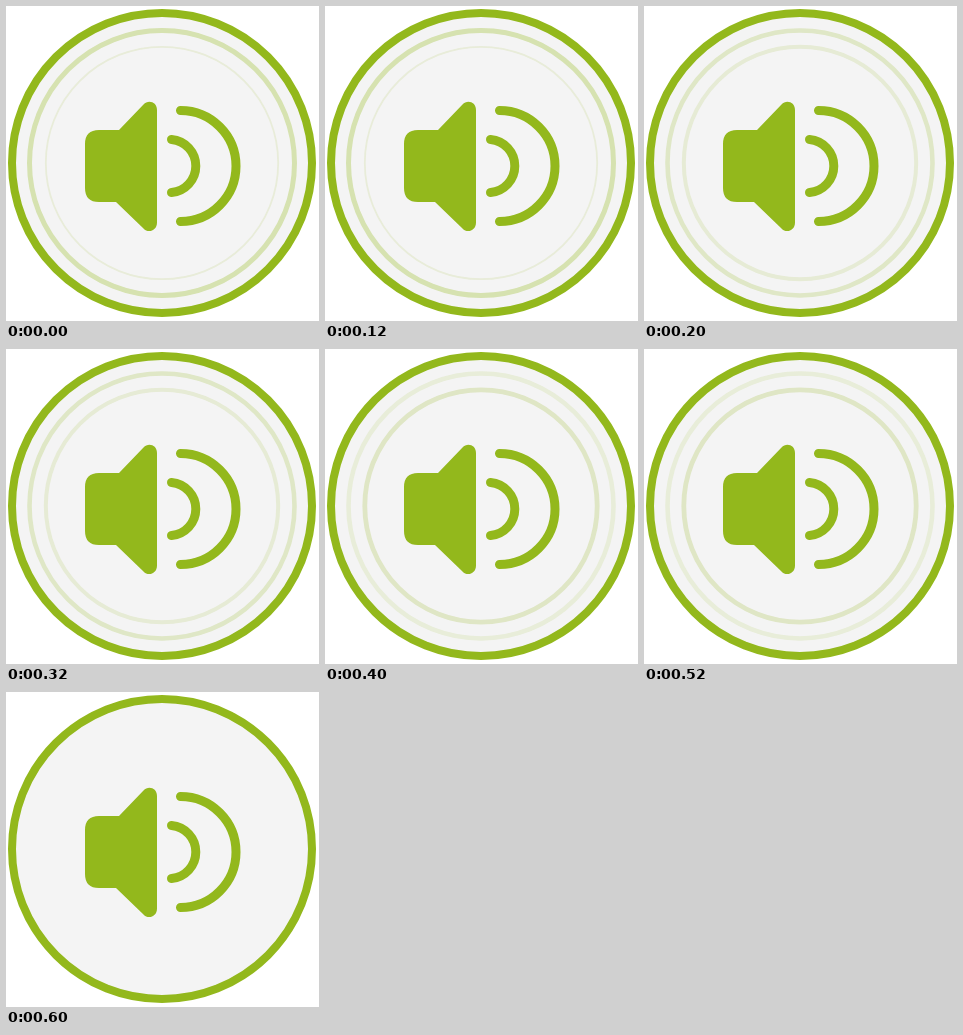
Recreate the animation shown at these times as an HTML page. Size 313 by 315 pixels, loop 700 ms.

```html
<!DOCTYPE html>
<html lang="en">
<head>
<meta charset="utf-8">
<title>Sound button</title>
<style>
  html, body { margin: 0; width: 100%; height: 100%; overflow: hidden; background: #fff; }
  svg { display: block; width: 313px; height: 315px; }
</style>
</head>
<body>
<svg viewBox="0 0 313 315" fill="none" stroke="#93b81c" stroke-linecap="round">
  <circle cx="156" cy="157" r="150" fill="#f4f4f4" stroke-width="8"/>
  <circle id="outer" cx="156" cy="157" r="132.5"/>
  <circle id="inner" cx="156" cy="157" r="116.2"/>
  <path fill="#93b81c" stroke="none" d="M93 124H113L137.500 98.500C142 93.500 151 95.500 151 104V216.500C151 225 142 227.500 137.500 222.500L110 196H93Q79 196 79 182V138Q79 124 93 124Z"/>
  <path stroke-width="9" d="M165.500 133.500A26.600 26.600 0 0 1 165.500 186.500M174.500 104.500A55.500 55.500 0 0 1 174.500 215.500"/>
</svg>
<script>
  const LOOP = 700, STEP = 200;
  // [colour, width] of each ripple per step; the last step shows none
  const ripples = {
    outer: [["#d6e2b0", 5], ["#dfe7c6", 4.6], ["#e8edd9", 4.6], ["none", 0]],
    inner: [["#e8ecd9", 1.8], ["#e6ebd5", 4], ["#dfe6c5", 4.8], ["none", 0]]
  };

  function draw(now) {
    const step = Math.floor(now % LOOP / STEP);
    for (const id in ripples) {
      const [colour, width] = ripples[id][step];
      const ring = document.getElementById(id);
      ring.setAttribute("stroke", colour);
      ring.setAttribute("stroke-width", width);
    }
  }

  const start = performance.now();
  function tick() {
    draw(performance.now() - start);
    requestAnimationFrame(tick);
  }
  tick();
</script>
</body>
</html>
```
